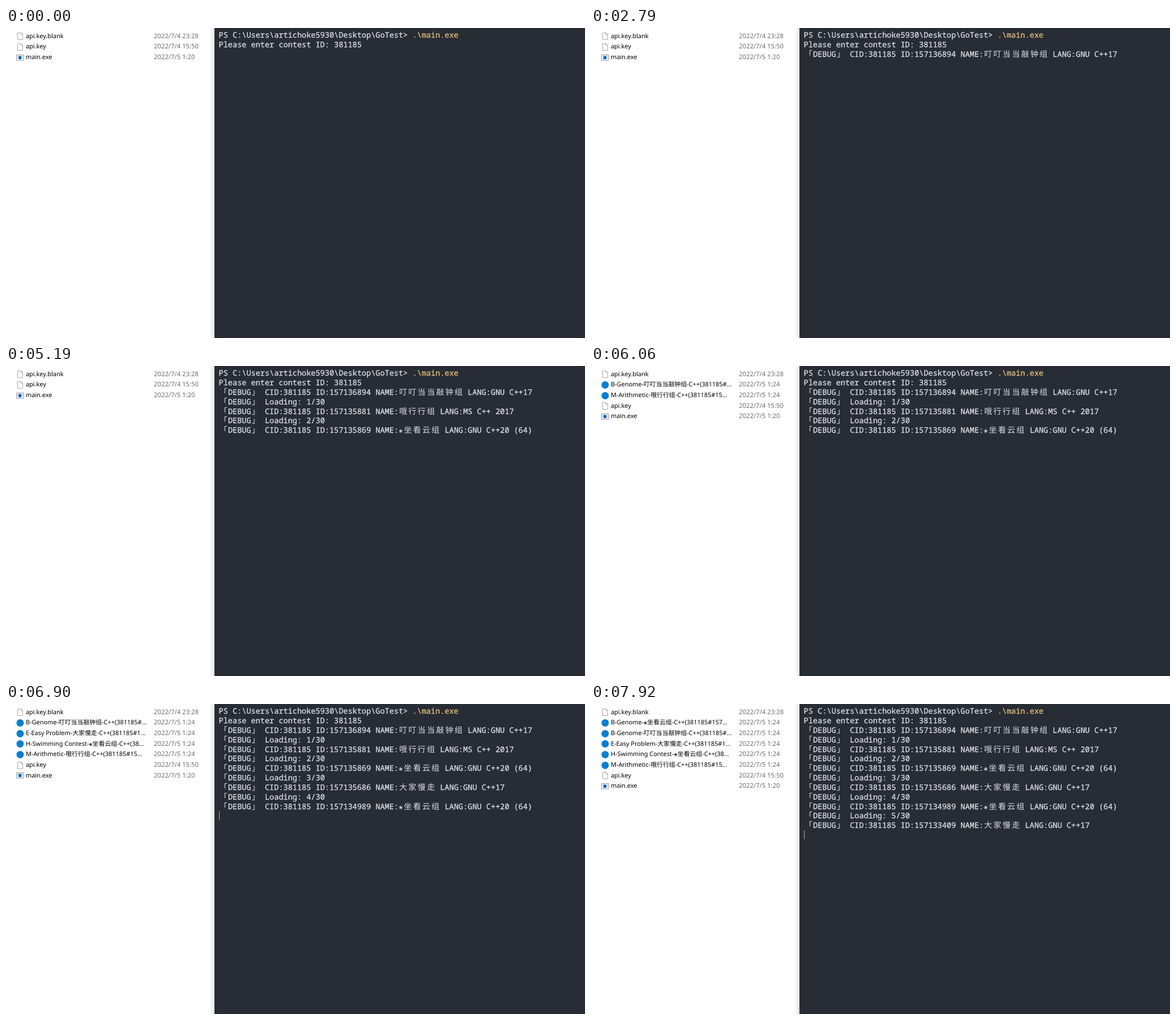
An HTML page for the animation above (8 s loop, 1022x548 px).

```html
<!DOCTYPE html>
<html lang="zh">
<head>
<meta charset="utf-8">
<title>Contest downloader</title>
<style>
html, body { margin: 0; width: 100%; height: 100%; overflow: hidden; background: #fff; }
body { position: relative; text-rendering: geometricPrecision; }
div, svg, time { position: absolute; white-space: pre; }
i, b { font-style: normal; font-weight: 400; line-height: 0; }
#shadow { left: 359px; width: 9px; height: 100%; background: linear-gradient(90deg, #0000, #0000000c 50%, #0002); }
#term {
  left: 368px; right: 0; height: 100%; background: #282c34; color: #dcdfe4;
  font: 500 13.57px/16.83px "Noto Sans Mono", monospace;
  -webkit-text-stroke: .3px;
}
#term div { left: 7.6px; }
#term i {
  position: relative; left: 1.1px; letter-spacing: 2.28px;
  font-family: "Noto Sans CJK SC", sans-serif; font-size: 14px;
  -webkit-text-stroke: 0;
}
#term b { font: 9px/0 "DejaVu Sans", sans-serif; letter-spacing: .6px; -webkit-text-stroke: 0; }
#term u { color: #e5c07b; text-decoration: none; }
#term #cursor { left: 8px; width: 1px; height: 16.83px; background: #a8aaae; }
.file { left: 0; width: 360px; height: 18.65px; color: #000; font: 10.9px/18.65px "Noto Sans", "Noto Sans CJK SC", sans-serif; }
.file div { left: 35px; }
.file b { font: 7.5px/0 "DejaVu Sans", sans-serif; }
.file svg { left: 18px; top: 1.5px; }
.file time { left: 261px; color: #6d6d6d; font-size: 11.3px; }
</style>
</head>
<body>
<div id="files"></div>
<div id="shadow"></div>
<div id="term"><div id="cursor"></div></div>
<script>
const LOOP = 8000, LINE = 16.83, ROW = 18.65;
const term = document.getElementById("term");
const files = document.getElementById("files");
const cursor = document.getElementById("cursor");

const markup = s => s.replace(/[\u3000-\u9fff]+/g, "<i>$&</i>").replace(/❀/g, "<b>$&</b>");
const add = (parent, html, top = 0) => {
  const el = parent.appendChild(document.createElement("div"));
  el.innerHTML = html;
  el.style.top = top + "px";
  return el;
};

// Terminal output: [time, text]
const [bell, fine, cloud, slow] = ["叮叮当当敲钟组", "哦行行组", "❀坐看云组", "大家慢走"];
const debug = s => "「DEBUG」 " + s;
const entry = (id, name, lang) => debug(`CID:381185 ID:${id} NAME:${name} LANG:${lang}`);
const loading = n => debug(`Loading: ${n}/30`);
const lines = [
  [0, "PS C:\\Users\\artichoke5930\\Desktop\\GoTest&gt; <u>.\\main.exe</u>"],
  [0, "Please enter contest ID: 381185"],
  [1060, entry(157136894, bell, "GNU C++17")],
  [4240, loading(1)],
  [4270, entry(157135881, fine, "MS C++ 2017")],
  [5190, loading(2)],
  [5190, entry(157135869, cloud, "GNU C++20 (64)")],
  [6100, loading(3)],
  [6130, entry(157135686, slow, "GNU C++17")],
  [6760, loading(4)],
  [6800, entry(157134989, cloud, "GNU C++20 (64)")],
  [7690, loading(5)],
  [7720, entry(157133409, slow, "GNU C++17")],
].map(([time, text], n) => ({ time, el: add(term, markup(text), 4.2 + n * LINE) }));

const blinks = [70, 630, 1160, 1720, 2260, 2790, 3350, 3910, 4430, 4990, 5530, 6060, 6630, 7160, 7750];

// File list
const icons = {
  page: '<path d="M2.5 1.5h6l3 3v9h-9zM8.5 1.5v3h3" fill="#fafafa" stroke="#a3a3a3" stroke-width=".9"/>',
  code: '<circle cx="7" cy="7.4" r="6.5" fill="#0a7fd0"/>',
  app: '<path d="M.5 2.5h12.6v9.6H.5z" fill="#edf3f7" stroke="#8b949b" stroke-width=".9"/>' +
    '<path d="M4 4.6h5.2v5.5H4z" fill="#0063b1"/><path d="M2 5h1M2 7.4h1M10.4 5h1.4M10.4 7.4h1.4" stroke="#9fb2c1"/>',
};
const file = (icon, name, date) =>
  `<svg width="15" height="15">${icons[icon]}</svg><div>${markup(name)}</div><time>2022/7/${date}</time>`;
const source = name => file("code", name + "...", "5 1:24");
const entries = {
  blank: file("page", "api.key.blank", "4 23:28"),
  key: file("page", "api.key", "4 15:50"),
  main: file("app", "main.exe", "5 1:20"),
  B: source(`B-Genome-${bell}-C++(381185#`),
  B2: source(`B-Genome-${cloud}-C++(381185#157`),
  E: source(`E-Easy Problem-${slow}-C++(381185#1`),
  H: source(`H-Swimming Contest-${cloud}-C++(38`),
  M: source(`M-Arithmetic-${fine}-C++(381185#15`),
};
for (const id in entries) {
  entries[id] = add(files, entries[id]);
  entries[id].className = "file";
}
const listings = [
  [0, "blank key main"],
  [5340, "blank B M key main"],
  [6300, "blank B M key main H"],
  [6900, "blank B E H M key main"],
  [7920, "blank B2 B E H M key main"],
];

function draw(t) {
  let row = 0;
  for (const { time, el } of lines) {
    el.hidden = t < time;
    if (t >= time) row++;
  }
  cursor.style.top = 3.8 + row * LINE + "px";
  cursor.hidden = blinks.filter(b => b <= t).length % 2 === 0;

  const order = listings.filter(([time]) => time <= t).pop()[1].split(" ");
  for (const id in entries) {
    const slot = order.indexOf(id);
    entries[id].hidden = slot < 0;
    entries[id].style.top = 5.8 + slot * ROW + "px";
  }
}

const start = performance.now();
function tick() {
  draw((performance.now() - start) % LOOP);
  requestAnimationFrame(tick);
}
tick();
</script>
</body>
</html>
```
